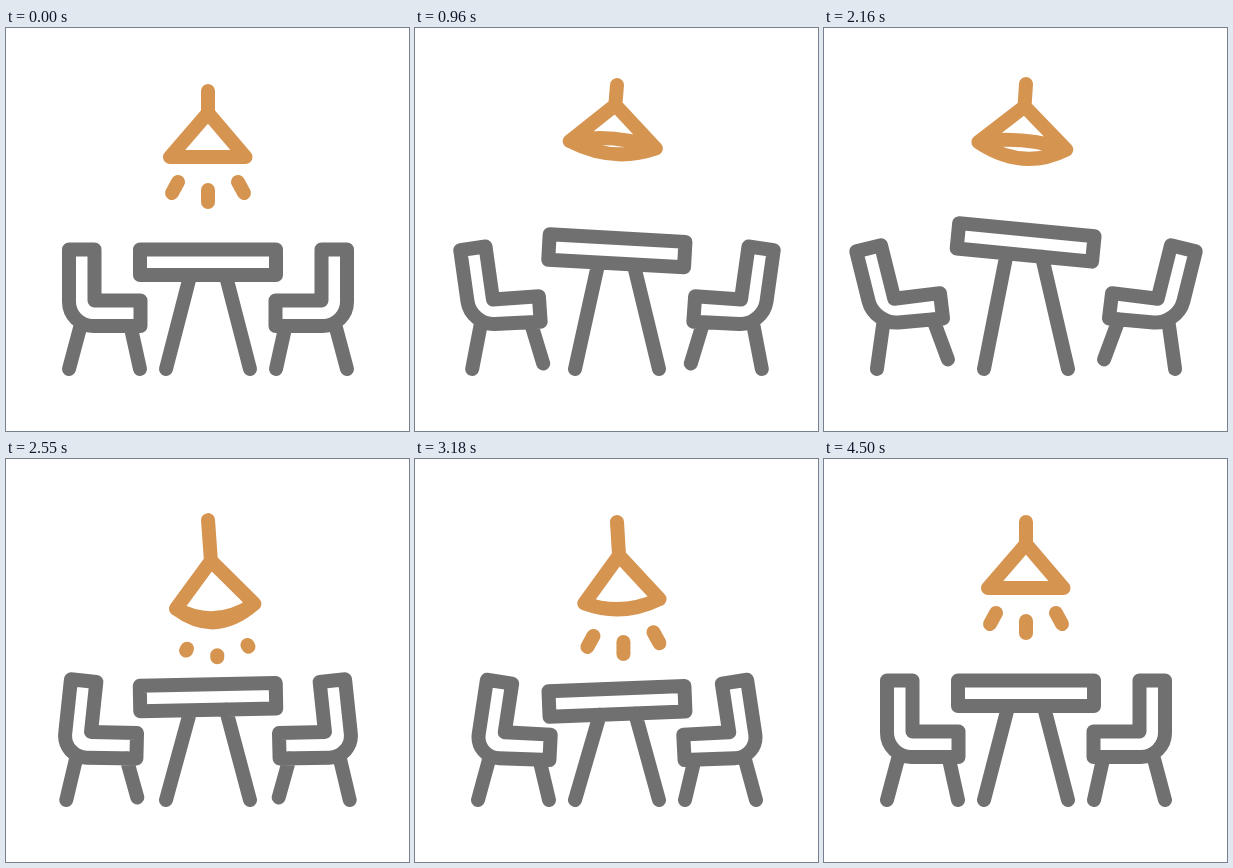
Animation, 403 px wide and 403 px high, one loop 5.4 s. Source, as an HTML page:

```html
<!DOCTYPE html>
<html lang="en">
<head>
<meta charset="utf-8">
<title>Dining table</title>
<style>
  html, body { margin: 0; width: 100%; height: 100%; overflow: hidden; background: #fff; }
  svg { display: block; width: 100vw; height: 100vh; }
  path { fill: none; stroke-width: 14; stroke-linecap: round; stroke-linejoin: round; }
  .wood { stroke: #707070; }
  .lamp { stroke: #d69451; }
</style>
</head>
<body>
<svg viewBox="0 0 403 403">
  <path id="chairL" class="wood"/>
  <path id="chairR" class="wood" transform="matrix(-1 0 0 1 404 0)"/>
  <path id="table" class="wood"/>
  <path id="lamp" class="lamp"/>
  <path id="rays" class="lamp"/>
</svg>
<script>
const LOOP = 5400;
const FLOOR = 341;
const DEPTH = 25.5; // thickness of seat, back and table top
const el = id => document.getElementById(id);

// Easing
function ease(t, from, to) {
  const u = Math.min(1, Math.max(0, (t - from) / (to - from)));
  return u * u * (3 - 2 * u);
}
const bump = (t, start, peak, end) => ease(t, start, peak) * (1 - ease(t, peak, end));

// Points and directions
const add = (p, q, k = 1) => [p[0] + q[0] * k, p[1] + q[1] * k];
const mix = (p, q, k) => [p[0] + (q[0] - p[0]) * k, p[1] + (q[1] - p[1]) * k];
const cross = (p, q) => p[0] * q[1] - p[1] * q[0];
const turn = ([x, y]) => [-y, x];
const dir = angle => [Math.cos(angle), Math.sin(angle)];
const deg = angle => dir(angle * Math.PI / 180);
const meet = (p, d, q, e) => add(p, d, cross(add(q, p, -1), e) / cross(d, e));

// Path text
const pt = p => p.map(v => v.toFixed(2)).join(' ');
const line = (...points) => 'M' + points.map(pt).join('L');

// The back leans twice as far as the seat, while the feet slide outwards.
function chair(lift, dip) {
  const tilt = lift - dip;
  const along = deg(-9 * tilt), base = deg(-6.5 * tilt), across = deg(-18 * (lift - 1.5 * dip));
  const under = turn(along), down = turn(across);

  const pivot = [88.5 - 19.5 * lift, 298 - 2.5 * tilt];
  const hinge = add(pivot, under, -DEPTH);
  const back = add(hinge, down, -51 - 5.4 * tilt);
  const top = add(back, across, -DEPTH);
  const seat = add(hinge, along, 46);
  const front = add(seat, under, DEPTH);
  const corner = meet(front, base, top, down);
  const curve = [add(corner, base, 11), add(corner, down, -11), add(corner, down, -24)];

  const foot = 63 - 13 * lift;
  return line(top, back, hinge, seat, front, add(corner, base, 24)) +
    'C' + curve.map(pt).join(' ') + 'Z' +
    line(add(front, base, -60), [foot, FLOOR]) +
    line(add(front, base, -10), [foot + 71, FLOOR - 12.4 * lift]);
}

// The left end rises twice as far as the right one.
function table(tilt) {
  const angle = Math.atan2(17 * tilt, 136);
  const across = dir(angle), down = turn(across);
  const a = [134 + 1.5 * tilt, 221.5 - 34 * tilt];
  const b = add(a, across, 136);
  const c = add(a, down, DEPTH), d = add(b, down, DEPTH);
  return line(a, b, d, c) + 'Z' +
    line(mix(c, d, 0.37), [160, FLOOR]) + line(mix(c, d, 0.63), [244, FLOOR]);
}

function shade(lift, droop) {
  const place = (rest, up, fall) => add(add(rest, up, lift), fall, droop);
  return {
    apex: place([202, 85], [-2.5, -12], [3.5, 19.5]),
    left: place([164, 129], [-14, -24], [9, 26]),
    right: place([239.5, 129], [2, -13], [8.5, 18.7])
  };
}

function lamp({ apex, left, right }, lift, droop) {
  const mid = mix(left, right, 0.5);
  const rim = sag => 'M' + pt(left) + 'Q' + pt(add(mid, [0, 2 * sag])) + ' ' + pt(right);
  return line([202, 63 - 9 * lift], apex) + line(left, apex, right) +
    rim(14 * lift + 13 * droop) + rim(14 * droop - 9.5 * lift);
}

// The rays follow the shade and shrink as it lifts.
function rays({ left, right }, lift) {
  const size = 1 - 4 * lift;
  if (size <= 0) return '';
  const mid = mix(left, right, 0.5);
  const shift = [(mid[0] - 201.75) * 1.25, (mid[1] - 129) * 1.6];
  const slope = (right[1] - left[1]) / (right[0] - left[0]);
  return [-1, 0, 1].map(side => {
    const x = side * (33 - 11 * lift);
    const center = add([202 + x, (side ? 159.5 : 168) + x * slope], shift);
    const half = side ? [side * 3, 5.5] : [0, 6];
    return line(add(center, half, -size), add(center, half, size));
  }).join('');
}

function draw(t) {
  const fall = 1 - ease(t, 1860, 2840);
  const lift = ease(t, 510, 1480) * fall;
  const lampLift = ease(t, 620, 1180) * fall;
  const crouch = bump(t, 210, 540, 930);
  const dip = 0.32 * crouch + 0.4 * bump(t, 2160, 2640, 4500);
  const droop = 0.5 * crouch + bump(t, 1860, 2580, 4500) ** 2;

  const seat = chair(lift, dip);
  const cone = shade(lampLift, droop);
  el('chairL').setAttribute('d', seat);
  el('chairR').setAttribute('d', seat);
  el('table').setAttribute('d', table(lift - dip));
  el('lamp').setAttribute('d', lamp(cone, lampLift, droop));
  el('rays').setAttribute('d', rays(cone, lampLift));
}

function tick() {
  draw(performance.now() % LOOP);
  requestAnimationFrame(tick);
}
tick();
</script>
</body>
</html>
```
